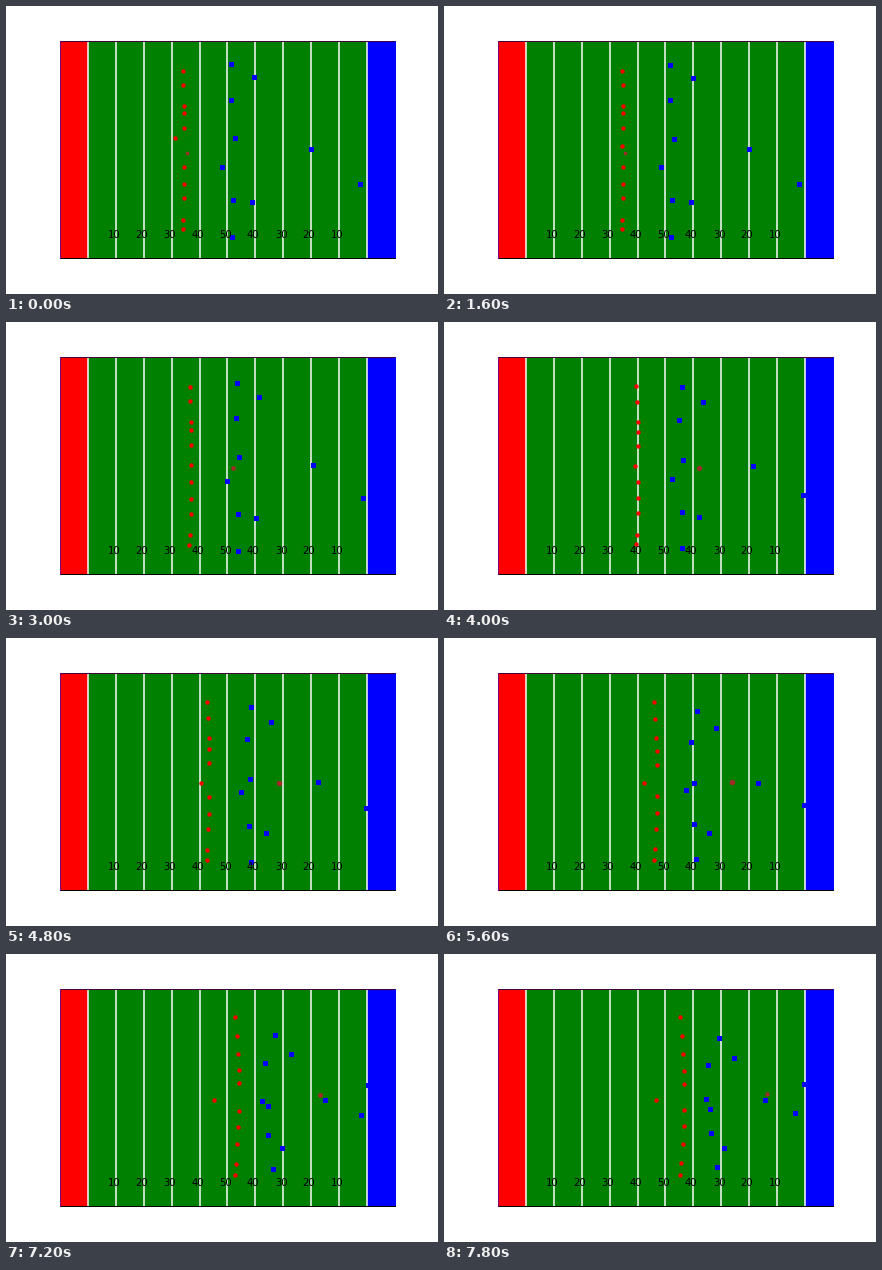
Write a matplotlib script that moves like this. It is 432 px wide and 288 px high and loops after 8 s.

```python
import numpy as np
import matplotlib.pyplot as plt
from matplotlib.animation import FuncAnimation
from matplotlib.patches import Rectangle

W, H, DPI = 432, 288, 72
STEP, FRAMES = 200, 40
LEFT, RIGHT, TOP, BOTTOM = 54, 388.8, 35, 252
YARD = (RIGHT - LEFT) / 120
KICK = 1.8

# Lanes of the kicking team at the start and at the end of the run
LANE_START = np.array([65, 79, 100, 107, 122, 161, 178, 192, 214, 223])
LANE_END = np.array([63, 82, 100, 117, 130, 156, 172, 190, 209, 221])

# Receiving team: where each player starts and ends
RETURN_START = np.array([
    (225, 58), (248, 71), (225, 94), (229, 132), (305, 143), (216, 161),
    (227, 194), (246, 196), (226, 231), (354, 178), (378, 138)])
RETURN_END = np.array([
    (275, 84), (290, 104), (264, 111), (266, 155), (321, 146), (262, 145),
    (267, 179), (280, 194), (273, 213), (351, 159), (360, 130)])
DEEP_MAN, DEEP_BOW = 9, 7.5  # drops back before coming forward


def run(t):
    """Standing still that softly becomes a steady run, 1 at the end."""
    return 0.14 * np.log1p(np.exp((t - 2.8) / 0.7))


def kicking_team(t):
    s = run(t)
    y = LANE_START + (LANE_END - LANE_START) * s
    x = 178 + 62.5 * s - (1.5 + 3 * s) * ((y - 140) / 80) ** 2
    kicker = 169 + 5.45 * t, 146 - 14 * np.exp(-t / 1.9)
    return np.append(x, kicker[0]), np.append(y, kicker[1])


def receiving_team(t):
    s = run(t)
    spots = RETURN_START + (RETURN_END - RETURN_START) * s
    spots[DEEP_MAN, 0] += DEEP_BOW * 4 * s * (1 - s)
    return spots.T


def ball_flight(t):
    """Fast off the foot, then slowed by drag."""
    d = max(t - KICK, 0)
    return [181 + 113 * np.log1p(d / 2.4)], [146.5 - 0.18 * d * d]


def yard_x(yard):
    return LEFT + yard * YARD


def draw_field(ax):
    for start, length, color in ((0, 120, "green"), (0, 10, "red"),
                                 (110, 10, "blue")):
        ax.add_patch(Rectangle((yard_x(start), TOP), length * YARD,
                               BOTTOM - TOP, fc=color, ec="none"))
    for yard in range(10, 111, 10):
        ax.plot([yard_x(yard)] * 2, [TOP, BOTTOM], color="white", lw=1.5,
                solid_capstyle="butt", zorder=1.5)
    corners = [(LEFT, TOP), (RIGHT, TOP), (RIGHT, BOTTOM), (LEFT, BOTTOM)]
    sides = zip(corners, corners[1:] + corners[:1],
                ("#400040", "blue", "black", "purple"))
    for a, b, color in sides:
        ax.plot(*zip(a, b), color=color, lw=1, zorder=1.6)
    for yard in range(20, 101, 10):
        ax.text(yard_x(yard - 3), 232, str(50 - abs(60 - yard)),
                fontsize=10, family="DejaVu Sans", color="black")


fig = plt.figure(figsize=(W / DPI, H / DPI), dpi=DPI, facecolor="white")
ax = fig.add_axes([0, 0, 1, 1])
ax.set(xlim=(0, W), ylim=(H, 0))
ax.axis("off")
draw_field(ax)

ball, = ax.plot([], [], "o", color="brown", mew=0)
reds, = ax.plot([], [], "o", color="red", ms=4.4, mew=0)
blues, = ax.plot([], [], "s", color="blue", ms=5, mew=0)


def update(frame):
    t = frame * STEP / 1000
    reds.set_data(*kicking_team(t))
    blues.set_data(*receiving_team(t))
    ball.set_data(*ball_flight(t))
    flight = max(t - KICK, 0) / 7
    ball.set_markersize(3.5 + 2 * np.sin(np.pi * flight))
    return ball, reds, blues


anim = FuncAnimation(fig, update, frames=FRAMES, interval=STEP,
                     repeat=True, repeat_delay=0, blit=False)
plt.show()
```
